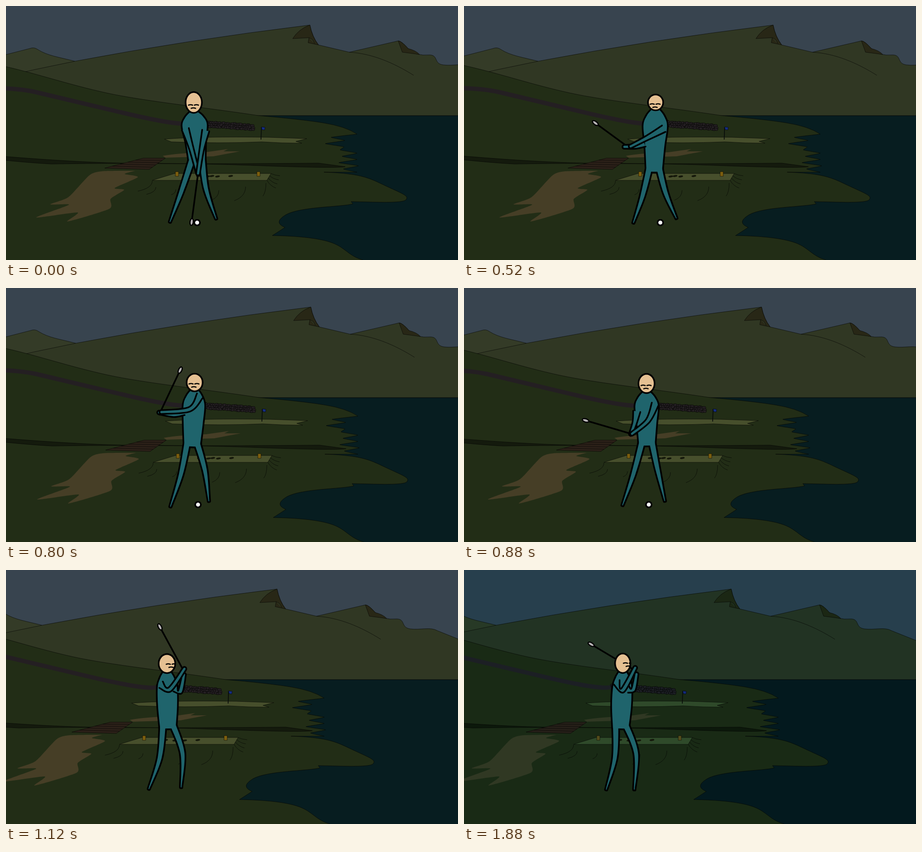
Animation of 998x561 px, one loop 1.92 s. Source, as an HTML page:

```html
<!DOCTYPE html>
<html lang="en">
<head>
<meta charset="utf-8">
<title>Golf swing by the bay</title>
<style>
html, body { margin: 0; width: 100%; height: 100%; overflow: hidden; background: #38444f; }
svg {
  display: block; width: 100vw; height: 100vh;
  --sky: #38444f; --hill: #343b27; --mount: #303723; --rock: #282716;
  --land: #222d16; --sea: #071d20; --wall: #241f22; --green: #474f2c;
  --sand: #463e26; --wood: #2b2018; --ditch: #141a0d; --flag: #142c82; --mark: #7c5e0e;
}
svg.flash {
  --sky: #273f4d; --hill: #273926; --mount: #223323; --rock: #1b2714;
  --land: #192a15; --sea: #03191e; --wall: #1c1f24; --green: #2f4a2a;
  --sand: #303823; --wood: #251f18; --ditch: #0c180b; --flag: #122a7c; --mark: #544d1b;
}
.ink { stroke: #000; stroke-opacity: .6; stroke-width: 1; stroke-linejoin: round; }
.line { fill: none; }
#golfer { stroke-linecap: round; stroke-linejoin: round; }
.suit { fill: #1f646c; }
.pen { stroke: #000; stroke-width: 3.6; }
</style>
</head>
<body>
<svg id="stage" viewBox="0 0 998 561" preserveAspectRatio="none">
  <defs><g id="body"><path id="legL"/><path id="legR"/><path id="torso"/></g></defs>
  <rect width="998" height="561" fill="var(--sky)"/>
  <g id="scene">
    <rect class="ink" x="-30" y="242" width="1140" height="340" fill="var(--sea)"/>
    <path class="ink" fill="var(--hill)" d="M-30 115L52 94Q62 90 70 96C92 110 118 113 152 122V170H-30Z"/>
    <path class="ink" fill="var(--mount)" d="M-30 162Q60 140 152 122Q400 75 671 42Q676 68 690 86L758 102L866 77Q873 77 888 94T936 108C955 109 944 127 965 130S1010 125 1025 134T1110 168V242H-30Z"/>
    <path class="ink line" d="M758 102C808 105 855 125 900 153"/>
    <path class="ink" fill="var(--rock)" d="M671 42Q646 51 633 72L669 70L667 81L690 86Q676 68 671 42ZM669 70Q678 73 681 83M866 77L875 102L913 107Q905 98 888 94Q873 77 866 77Z"/>
    <path id="land" class="ink" fill="var(--land)"/>
    <path class="line" stroke="var(--wall)" stroke-width="9.5" d="M-30 181Q30 182 65 190T250 234T410 256"/>
    <g id="stones" class="ink" fill="var(--wall)"></g>
    <path class="ink" fill="var(--green)" d="M350 294Q430 288 580 290L664 293L640 299L653 303Q610 303 565 300Q470 304 365 300Z"/>
    <path class="line" stroke="#080c0a" stroke-width="1.7" d="M563 295L564 267"/>
    <path class="ink" fill="var(--flag)" d="M564 267L572 268L571 274L565 273Z"/>
    <path fill="var(--sand)" d="M346 331Q380 325 440 323L490 316L480 321L516 321L458 332L352 335Z"/>
    <path class="ink" fill="var(--ditch)" d="M-30 330Q110 342 220 346T690 347L749 355Q725 359 540 352T100 349Q45 346 -30 338Z"/>
    <path id="bridge" class="ink" fill="var(--wood)"/>
    <path id="sand" fill="var(--sand)"/>
    <path class="ink" fill="var(--green)" d="M323 385L372 370H585L576 385Z"/>
    <g id="divots" fill="#131609"></g>
    <path class="ink" fill="var(--mark)" d="M374 366h7v10h-7zM554 366h7v10h-7z"/>
    <path id="cracks" class="ink line"/>
    <circle id="ball" cx="422" cy="478.4" r="6.2" fill="#fff" stroke="#000" stroke-width="3.6"/>
  </g>
  <g id="golfer">
    <path id="shaft" class="line pen" stroke-width="3"/>
    <ellipse id="blade" rx="7.5" ry="3.6" fill="#b9b5b7" stroke="#000" stroke-width="2.6"/>
    <use href="#body" stroke="#000" stroke-width="7.4"/>
    <use href="#body" class="suit"/>
    <ellipse id="head" class="pen" fill="#e5c092"/>
    <path id="face" class="line" stroke="#000" stroke-width="2.6"/>
    <g id="arms" class="suit pen"><path id="armL"/><path id="armR"/></g>
  </g>
</svg>
<script>
const $ = id => document.getElementById(id);
const LOOP = 1920, STEP = 40, HIT = 920, FLASH = 1880;

// A pose is a small rig: legs hold knee and foot, arms hold shoulder, elbow and hand.
// club: angle and length, move: camera and body shift.
const address = {
  head: [414.5, 213, 18, 23], face: [414, 219], chest: [27], pelvis: [422, 346],
  legL: [387, 410, 362, 477], legR: [442, 405, 464, 470],
  armL: [396, 272, 409, 314, 424, 370], armR: [441, 275, 432, 318, 424, 370],
  club: [97.5, 108], move: [0, 0]
};
const takeaway = {
  head: [423, 213, 16.8, 17.5], face: [422, 217], chest: [26], pelvis: [420, 366],
  legL: [394, 420, 374, 479], legR: [446, 415, 469, 469],
  armL: [398, 303, 380, 310, 354, 311], armR: [441, 271, 403, 292, 368, 310],
  club: [216.2, 88], move: [11.5, 0]
};
const backswing = {
  head: [416.5, 208.7, 17.7, 19.5], face: [415, 212], chest: [23], pelvis: [411, 350],
  legL: [386, 412, 363, 483], legR: [439, 402, 448, 471],
  armL: [392, 273, 370, 280, 338, 275], armR: [428, 238, 405, 268, 343, 274],
  club: [295.3, 103], move: [2, 0]
};
const impact = { ...address, move: [-30, -25] };
const release = {
  head: [361.5, 207.5, 20, 20.5], face: [367, 211], chest: [22], pelvis: [372, 350],
  legL: [347, 415, 317, 482], legR: [402, 405, 400, 474],
  armL: [349, 260, 376, 261, 414, 221], armR: [388, 260, 398, 275, 408, 233],
  club: [-80, 110], move: [-62, 0]
};
const finish = {
  head: [350.5, 206, 17, 21.5], face: [363, 206], chest: [20], pelvis: [346, 350],
  legL: [333, 415, 314, 485], legR: [380, 405, 376, 485],
  armL: [337, 248, 350, 266, 378, 216], armR: [363, 263, 374, 264, 381, 230],
  club: [-149.2, 115], move: [-81, 0]
};

const easeIn = u => 1 - Math.cos(u * Math.PI / 2);
const easeOut = u => Math.sin(u * Math.PI / 2);
const linear = u => u;
const keys = [
  [260, address], [520, takeaway, easeIn], [800, backswing, easeOut],
  [HIT, impact, easeIn], [1000, release, linear], [1320, finish, easeOut]
];

const mix = (a, b, u) => a.map((v, i) => v + (b[i] - v) * u);
const pairs = flat => flat.flatMap((v, i) => i % 2 ? [] : [[v, flat[i + 1]]]);

function poseAt(t) {
  if (t <= keys[0][0]) return address;
  const i = keys.findIndex(k => t <= k[0]);
  if (i < 0) return finish;
  const [t0, a] = keys[i - 1], [t1, b, ease] = keys[i];
  const u = ease((t - t0) / (t1 - t0));
  return Object.fromEntries(Object.keys(a).map(part => [part, mix(a[part], b[part], u)]));
}

// Smooth curve through points; tension 6 is round, larger is straighter.
function spline(p, start = 'M', tension = 6) {
  const at = i => p[Math.max(0, Math.min(p.length - 1, i))];
  let d = start + p[0];
  for (let i = 0; i < p.length - 1; i++) {
    const [a, b, c, e] = [at(i - 1), at(i), at(i + 1), at(i + 2)];
    const pull = (q, from, to, s) => q.map((v, k) => v + s * (to[k] - from[k]) / tension);
    d += `C${pull(b, a, c, 1)},${pull(c, b, e, -1)},${c}`;
  }
  return d;
}

// Outline around a bent centre line with a half-width at each joint, open at its start.
function limb(joints, widths, round) {
  const side = s => joints.map(([x, y], i) => {
    const a = joints[Math.max(0, i - 1)], b = joints[Math.min(joints.length - 1, i + 1)];
    const dx = b[0] - a[0], dy = b[1] - a[1], k = s * widths[i] / (Math.hypot(dx, dy) || 1);
    return [x - dy * k, y + dx * k];
  });
  const w = widths.at(-1), back = side(-1).reverse();
  const cap = round ? `A${w} ${w} 0 0 0 ${back[0]}` : '';
  return spline(side(1)) + cap + spline(back, 'L');
}

function set(id, attrs) {
  for (const k in attrs) $(id).setAttribute(k, attrs[k]);
}

function drawBody(p) {
  const [cx, cy, rx, ry] = p.head, [px, py] = p.pelvis;
  const neck = [cx, cy + ry - 2];
  const spine = [0, .1, .26, .6, 1].map(u => mix(neck, p.pelvis, u));
  set('torso', { d: limb(spine, [8, p.chest[0] * .72, p.chest[0], 21, 17]) });
  for (const [id, s] of [['legL', -1], ['legR', 1]]) {
    set(id, { d: limb([[px + 11 * s, py - 8], ...pairs(p[id])], [6, 4.3, .8]) });
  }
  for (const id of ['armL', 'armR']) set(id, { d: limb(pairs(p[id]), [8, 5, 4.2], true) });
  set('head', { cx, cy, rx, ry });

  const [fx, fy] = p.face;
  const arch = (x, y, w) => `M${x} ${y}q${w / 2} -2 ${w} 0`;
  const farEye = Math.min(9, cx + rx - fx - 2);
  set('face', { d: arch(fx - 11, fy, 9) + arch(fx + 2, fy, farEye) + arch(fx - 5, fy + 7, 9.5) });
}

function drawClub({ club: [angle, len], armL, armR }) {
  const grip = mix(armL.slice(4), armR.slice(4), .5), rad = angle * Math.PI / 180;
  const reach = r => [grip[0] + r * Math.cos(rad), grip[1] + r * Math.sin(rad)];
  set('shaft', { d: `M${grip}L${reach(len - 7)}` });
  set('blade', { transform: `translate(${reach(len)}) rotate(${angle})` });
}

function draw(now) {
  const t = Math.floor(now % LOOP / STEP) * STEP;
  const p = poseAt(t);
  $('stage').classList.toggle('flash', t >= FLASH);
  set('scene', { transform: `translate(${p.move[0]})` });
  set('golfer', { transform: `translate(${p.move[1]})` });
  set('ball', { visibility: t < HIT ? 'visible' : 'hidden' });
  drawBody(p);
  drawClub(p);
  const front = $(t < HIT ? 'armR' : 'armL');
  if ($('arms').lastElementChild !== front) $('arms').append(front);
}

function ellipse(x, y, rx, ry, turn = 0) {
  return `<ellipse cx="${x}" cy="${y}" rx="${rx}" ry="${ry}" transform="rotate(${turn} ${x} ${y})"/>`;
}

let seed = 7;
const random = () => (seed = seed * 16807 % 2147483647) / 2147483647;

function buildScene() {
  // Ragged inlets: the shore zigzags while it comes nearer.
  const inlets = [775, 718, 748, 705, 746, 738, 775, 742, 775, 735, 778, 745, 775].map((x, i) => [x, 283 + 7 * i]);
  set('land', {
    d: 'M-30 127L0 134C70 150 140 174 222 192S440 224 557 242Q650 250 700 258T775 283' +
      spline(inlets, 'L', 16) +
      'L702 367C790 370 805 382 842 399S890 420 883 428S815 433 762 432L766 437' +
      'C740 444 650 443 618 461C600 472 597 481 616 489L588 507C640 508 690 512 720 523S756 552 788 561V590H-30Z'
  });

  // Wind-blown sand: ragged edges to either side of a slanting bar.
  const edge = [[285, 364], [262, 371], [291, 378], [240, 402], [261, 406], [231, 426], [228, 448],
    [136, 476], [158, 456], [67, 467], [139, 439], [98, 438], [138, 422], [184, 374], [212, 365], [285, 364]];
  set('sand', { d: spline(edge, 'M', 9) });

  let planks = 'M303 336L352 336L316 361L218 358Z';
  for (let u = .2; u < 1; u += .2) planks += `M${303 - 85 * u} ${336 + 22 * u}L${352 - 36 * u} ${336 + 25 * u}`;
  set('bridge', { d: planks });

  // Folds of turf below and beside the tee: start and reach of each arc.
  const folds = [[323, 386, -32, 23], [331, 400, -21, 16], [375, 405, -10, 12], [470, 407, -17, 22],
    [529, 399, -25, 31], [574, 391, -7, 29]];
  const sprays = [0, 1, 2, 3].map(i => `M${585 - 3 * i} ${370 + 5 * i}q8 ${4 + 3 * i} 20 ${5 + 4 * i}`);
  set('cracks', { d: folds.map(([x, y, w, h]) => `M${x} ${y}q0 ${h * .7} ${w} ${h}`).join('') + sprays.join('') });

  let stones = '';
  for (let x = 408; x < 546; x += 4.5) {
    for (let row = -1; row <= 1; row++) {
      const y = 261 + (x - 447) * .075 + row * 4.4;
      stones += ellipse(x + random() * 3, y + random() * 1.6 - .8, 3.4 + random(), 2.4 + random() * .6, random() * 50 - 25);
    }
  }
  $('stones').innerHTML = stones;
  $('divots').innerHTML = [425, 445, 454.5, 467, 496]
    .map((x, i) => ellipse(x, 375.5 + i % 2, 5.2, 2, -8)).join('');
}

let begin;
function tick(now) {
  begin ??= now;
  draw(Math.max(0, now - begin));
  requestAnimationFrame(tick);
}
buildScene();
draw(0);
requestAnimationFrame(tick);
</script>
</body>
</html>
```
